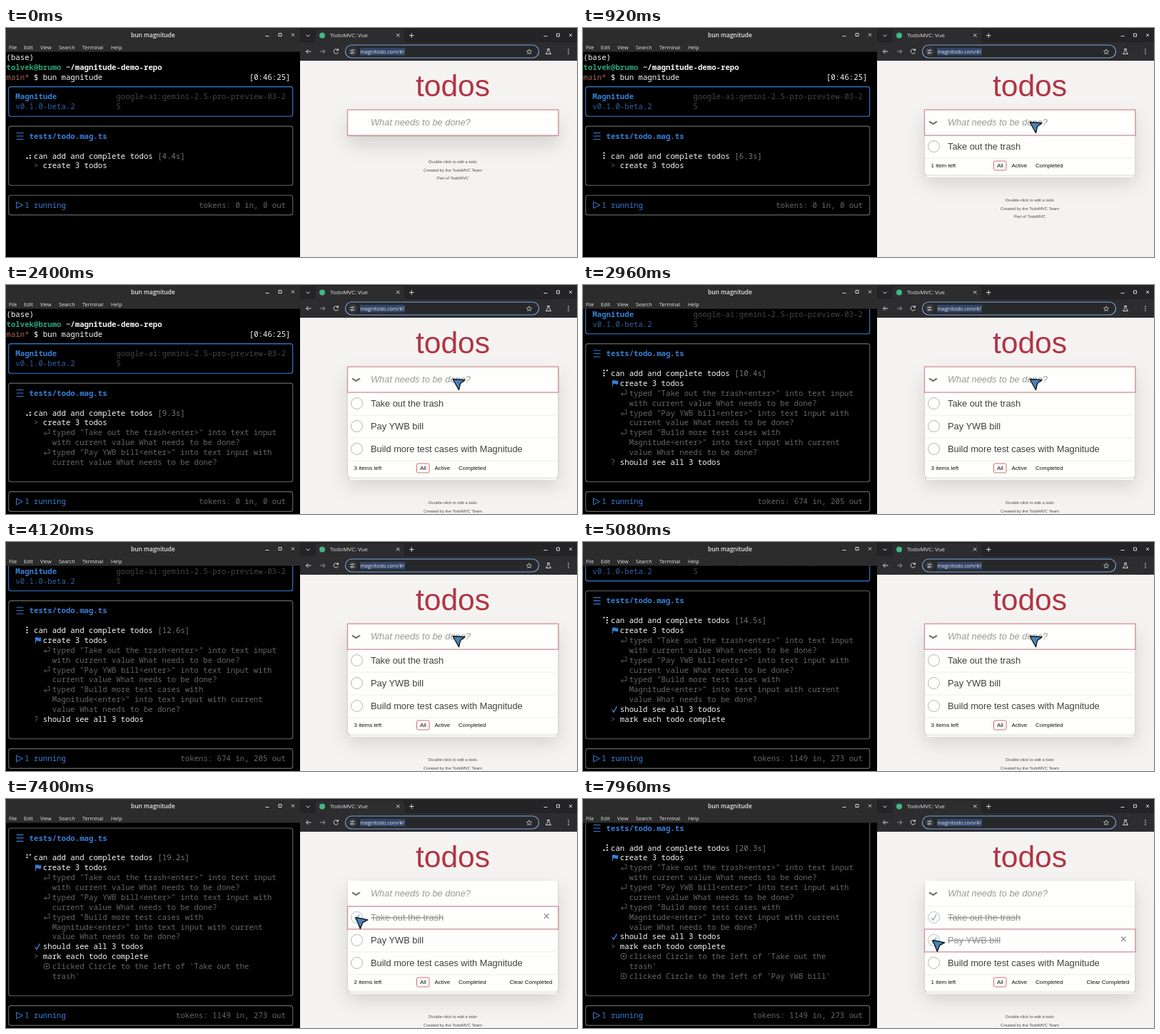
Recreate the animation shown at these times as an HTML page. Size 800 px wide and 322 px high, loop 8000 ms.

```html
<!DOCTYPE html>
<html lang="en">
<head>
<meta charset="utf-8">
<title>Test run</title>
<style>
html, body { margin: 0; width: 100%; height: 100%; overflow: hidden; background: #000; }
svg { display: block; width: 800px; height: 322px; }
text { white-space: pre; }
.term { font: 500 10.7px "Noto Sans Mono", monospace; }
.ui { font: 7.2px "Open Sans", sans-serif; fill: #e6e6e6; }
.page { font-family: "Liberation Sans", Arial, sans-serif; }
.line { fill: none; stroke: #d8d8d8; stroke-width: 1; }
.card { fill: #fefefd; filter: drop-shadow(0 1px 1px #0003) drop-shadow(0 13px 13px #0002); }
.sheet { fill: #f8f8f7; filter: drop-shadow(0 .6px .5px #0005); }
</style>
</head>
<body>
<svg viewBox="0 0 800 322">
  <defs><clipPath id="screen"><rect y="33.5" width="412" height="289"/></clipPath></defs>

  <rect width="412" height="322"/>
  <rect width="412" height="33.5" fill="#2c2c2c"/>
  <g class="ui">
    <text x="206" y="12.5" text-anchor="middle" font-weight="600" style="font-size:8.4px">bun magnitude</text>
    <text x="4" y="29.5">File</text><text x="25" y="29.5">Edit</text><text x="48" y="29.5">View</text>
    <text x="74" y="29.5">Search</text><text x="107" y="29.5">Terminal</text><text x="147" y="29.5">Help</text>
  </g>
  <path class="line" d="M363.5 11.500h5M382 7.500h4v4h-4zM400 7.500l4 4m0-4l-4 4"/>
  <g id="terminal" class="term" clip-path="url(#screen)"></g>

  <rect x="412" width="388" height="322" fill="#f4f3f2"/>
  <rect x="412" width="388" height="46" fill="#2d2d30"/>
  <path d="M412 0H800V20H562q-4 0-4-4V5q0-3-3-3H437q-3 0-3 3v11q0 4-4 4H412z" fill="#242427"/>
  <circle cx="443" cy="10.500" r="4" fill="#41b883"/>
  <path class="line" d="M420.5 9.500l2.500 2.500 2.500-2.500M547 8l4.500 4.500m0-4.500l-4.500 4.500M565 10.500h6.500m-3.250-3.250v6.500
    M753.5 11.500h5M771.5 8h4v4h-4zM789 8l4 4m0-4l-4 4M427.5 33h-7m3-3l-3 3 3 3"/>
  <path class="line" d="M440 33h7m-3-3l3 3-3 3" style="stroke:#999"/>
  <path class="line" d="M465 31a3.200 3.200 0 1 0 .4 3M465.5 29v2.500h-2.500"/>
  <rect x="475.5" y="24" width="271" height="18" rx="9" fill="#27282a" stroke="#7fa4dc" stroke-width="1.200"/>
  <circle cx="485.5" cy="33" r="6.500" fill="#37383b"/>
  <path class="line" d="M482.5 31.500h2.500M482.5 35h1m2.500 0h2.500"/>
  <circle class="line" cx="486.5" cy="31.500" r="1"/><circle class="line" cx="484.5" cy="35" r="1"/>
  <rect x="496" y="28" width="63" height="10.500" fill="#33466a"/>
  <g class="ui">
    <text x="454" y="13.300" style="font-size:7.9px">TodoMVC: Vue</text>
    <text x="496.5" y="35.700" style="font-size:7.05px">magnitodo.com/#/</text>
  </g>
  <path class="line" transform="translate(733 33.3) scale(.78)" d="M0-4.500l1.300 3 3.200.3-2.400 2.100.7 3.200-2.800-1.700-2.800 1.700.7-3.200-2.400-2.100 3.200-.3z"/>
  <path class="line" d="M758 29.500h4m-3 0v3l-2.500 4h7l-2.500-4v-3"/>
  <path d="M788 30v.01m0 2.990v.01m0 2.990v.01" stroke="#ddd" stroke-width="1.700" stroke-linecap="round"/>
  <g id="page" class="page"></g>
</svg>

<script>
const LOOP = 8000, TICK = 40, COL = 6.42, ROW = 13.87;
const BLUE = '#397fd6', DIM_BLUE = '#2c61a5', GREY = '#666', DARK = '#404040', WHITE = '#f6f6f6';
const TODOS = ['Take out the trash', 'Pay YWB bill', 'Build more test cases with Magnitude'];
const TYPING = [[420, 760], [1340, 1600], [2080, 2400]];
const CHECKED = [6740, 7560, Infinity];
const BRAILLE = ['124', '145', '1456', '456', '3456', '356', '236', '1236', '123', '1234'];

// time, seconds on the timer
const CLOCK = [[0, 4.4], [920, 6.3], [1960, 8.4], [2960, 10.4], [5080, 14.5], [6760, 17.9], [8000, 20.4]];
// time, x, y, angle
const POINTER = [[0, 626, 132.5, 0], [6710, 626, 132.5, 0], [7000, 490, 166.5, 8],
  [7420, 490, 166.5, 8], [7640, 490, 198.5, 8], [8000, 490, 198.5, 8]];

// terminal steps: time shown, icon, column, colour, lines
const STEPS = [
  [0, 'step', 8, WHITE, 'create 3 todos'],
  [1280, 'enter', 10, GREY, 'typed "Take out the trash<enter>" into text input', 'with current value What needs to be done?'],
  [2040, 'enter', 10, GREY, `typed "${TODOS[1]}<enter>" into text input with`, 'current value What needs to be done?'],
  [2840, 'enter', 10, GREY, 'typed "Build more test cases with', 'Magnitude<enter>" into text input with current', 'value What needs to be done?'],
  [2840, 'check', 8, WHITE, 'should see all 3 todos'],
  [5080, 'next', 8, WHITE, 'mark each todo complete'],
  [7240, 'click', 10, GREY, "clicked Circle to the left of 'Take out the", "trash'"],
  [7840, 'click', 10, GREY, `clicked Circle to the left of '${TODOS[1]}'`],
];

const escape = s => s.replace(/&/g, '&amp;').replace(/</g, '&lt;');
const text = (x, y, s, fill, attrs = '') => `<text x="${x}" y="${y}" fill="${fill}" ${attrs}>${escape(s)}</text>`;
const path = (d, stroke, width = 1, fill = 'none') =>
  `<path d="${d}" stroke="${stroke}" stroke-width="${width}" fill="${fill}"/>`;
const rect = (x, y, w, h, attrs) => `<rect x="${x}" y="${y}" width="${w}" height="${h}" ${attrs}/>`;

function sample(keys, t, ease = p => p) {
  const i = Math.max(1, keys.findIndex(k => k[0] > t));
  const a = keys[i - 1], b = keys[i];
  const p = ease((t - a[0]) / (b[0] - a[0]));
  return a.slice(1).map((v, n) => v + (b[n + 1] - v) * p);
}

function drawTerminal(t) {
  const steps = STEPS.filter(s => s[0] <= t);
  const end = 13 + steps.reduce((n, s) => n + s.length - 4, -1);
  const scroll = Math.max(0, end + 3 - 20);
  const [seconds] = sample(CLOCK, t);
  const mid = row => 41 + (row - scroll) * ROW;
  const put = (col, row, s, fill, bold) =>
    text(0.5 + col * COL, mid(row) + 3.8, s, fill, bold ? 'font-weight="700"' : '');
  const box = (from, to, stroke) =>
    rect(3.7, mid(from), 398, (to - from) * ROW, `rx="3" fill="none" stroke="${stroke}" stroke-width="1.1"`);
  const icon = (name, row) => {
    const y = mid(row);
    switch (name) {
      case 'enter': return path(`M61 ${y - 4}v5.500h-7.500m2.500-2.500l-2.500 2.500 2.500 2.500M58.500 ${y - 4}h2.500`, GREY, 0.9);
      case 'click': return `<circle cx="57" cy="${y}" r="4" fill="none" stroke="${GREY}"/><circle cx="57" cy="${y}" r="1.200" fill="${GREY}"/>`;
      case 'flag': return path(`M41.5 ${y + 4.5}v-8.500`, BLUE, 1.1) + path(`M42 ${y - 3.5}q2-1 3.500 0t3.500 0v4.500q-2 1-3.500 0t-3.500 0z`, BLUE, 0.5, BLUE);
      case 'done': return path(`M40.5 ${y + 0.5}l2.500 3.500 4.500-8`, BLUE, 1.3);
      default: return put(6, row, name, GREY);
    }
  };
  const labels = {
    step: t < 2840 ? '>' : 'flag',
    check: t < 5080 ? '?' : 'done',
    next: '>',
  };
  const tokens = t < 2840 ? '0 in, 0 out' : t < 5080 ? '674 in, 205 out' : '1149 in, 273 out';
  const usage = 'tokens: ' + tokens;

  let out = put(0, 0, '(base)', WHITE)
    + put(0, 1, 'tolvek@brumo', '#2fa37c', true) + put(13, 1, '~/magnitude-demo-repo', WHITE, true)
    + put(0, 2, 'main', '#a9655c') + put(4, 2, '*', '#d8463c') + put(6, 2, '$ bun magnitude', WHITE)
    + put(53, 2, '[0:46:25]', WHITE)
    + box(3, 6, BLUE) + put(2, 4, 'Magnitude', BLUE, true) + put(2, 5, 'v0.1.0-beta.2', DIM_BLUE)
    + put(24, 4, 'google-ai:gemini-2.5-pro-preview-03-2', '#454545') + put(24, 5, '5', '#454545')
    + box(7, end, GREY)
    + path(`M14.5 ${mid(8) - 4.5}h10m-10 4.500h10m-10 4.500h10`, BLUE, 1.1)
    + put(5, 8, 'tests/todo.mag.ts', BLUE, true)
    + put(6, 10, 'can add and complete todos', WHITE) + put(33, 10, `[${seconds.toFixed(1)}s]`, '#777');

  for (const dot of BRAILLE[(5 + t / TICK) % 10]) {
    const n = dot - 1;
    out += `<circle cx="${29.5 + (n > 2) * 4.3}" cy="${mid(10) - 4 + (n % 3) * 3.6}" r="1.1" fill="${WHITE}"/>`;
  }

  let row = 11;
  for (const [, kind, col, fill, ...lines] of steps) {
    out += icon(labels[kind] || kind, row);
    for (const line of lines) out += put(col, row++, line, fill);
  }

  const y = mid(end + 2);
  return out + box(end + 1, end + 3, GREY)
    + path(`M14.5 ${y - 4.5}l9 4.500-9 4.500z`, BLUE) + put(4, end + 2, '1 running', BLUE)
    + put(61 - usage.length, end + 2, usage, GREY);
}

function drawTodo(label, i, t) {
  const y = 167 + i * 32, done = t >= CHECKED[i];
  const fade = Math.min(1, Math.max(0, (t - CHECKED[i]) / 200));
  const shade = done ? Math.round(64 + 84 * fade) : 64;
  const color = `rgb(${shade},${shade},${shade})`;
  let out = path(`M479 ${y - 16}h295`, '#e6e6e6', 0.7)
    + `<circle cx="491.5" cy="${y - 0.5}" r="8" fill="none" stroke="${done ? '#9db5af' : '#a0a0a0'}" stroke-width=".8"/>`
    + text(511, y + 4, label, color, `font-size="12.85" ${done ? 'text-decoration="line-through"' : ''}`);
  if (done) out += path(`M488 ${y}l2.500 3.300 4.500-7.800`, '#6b9f95', 1.1);
  return out;
}

function drawPage(t) {
  const count = TYPING.filter(w => t >= w[1]).length;
  const clicked = CHECKED.filter(c => t >= c).length;
  const bottom = count ? 173 + count * 32 : 151;
  const typing = TYPING.findIndex(([a, b]) => t >= a && t < b);

  let out = text(626, 95.8, 'todos', '#b23545', 'font-size="42.6" text-anchor="middle"')
    + rect(479, 115, 294.5, bottom - 115, 'class="card"');
  if (count) {
    out += rect(482, 140, 289, bottom - 135, 'class="sheet"')
      + rect(480.5, 140, 292, bottom - 137.5, 'class="sheet"')
      + rect(479, 115, 294.5, bottom - 115, 'class="sheet" style="fill:#fefefd"');
  }

  if (typing >= 0) {
    const [a, b] = TYPING[typing], label = TODOS[typing];
    out += text(511, 137.3, label.slice(0, Math.ceil((t - a) / (b - a) * label.length)), DARK, 'font-size="12.85"');
  } else {
    out += text(511, 137.3, 'What needs to be done?', '#999', 'font-size="12.85" font-style="italic"');
  }

  if (count) {
    out += path('M485 131.300l5.500 3.700 5.500-3.700', '#737373', 2.2);
    out += TODOS.slice(0, count).map((label, i) => drawTodo(label, i, t)).join('');
    const y = bottom - 9, left = count - clicked;
    const small = (x, s, attrs = '') => text(x, y, s, '#111', 'font-size="8" ' + attrs);
    out += path(`M479 ${bottom - 22}h295`, '#e2e2e2', 0.7)
      + small(487.5, `${left} item${left === 1 ? '' : 's'} left`)
      + rect(575.5, y - 9, 17.5, 13, 'rx="1.8" fill="none" stroke="#ce5c5c" stroke-width=".9"')
      + small(580, 'All') + small(600.5, 'Active') + small(634, 'Completed');
    if (clicked) out += small(765.5, 'Clear Completed', 'text-anchor="end"');
  }

  const focusY = clicked ? 119 + clicked * 32 : 115;
  out += rect(478.5, focusY, 295.5, clicked ? 32 : 36, 'fill="none" stroke="#cf8a90" stroke-width="1.2"');
  if (clicked) out += path(`M754 ${focusY + 10.5}l6.500 6.500m0-6.500l-6.500 6.500`, '#888', 1.1);

  ['Double-click to edit a todo', 'Created by the TodoMVC Team', 'Part of TodoMVC'].forEach((line, i) => {
    out += text(626, bottom + 39 + i * 11.7, line, '#4d4d4d', 'font-size="5.9" text-anchor="middle"');
  });

  if (t >= TYPING[0][0]) {
    const [x, y, angle] = sample(POINTER, t, p => p * p * (3 - 2 * p));
    out += `<g transform="translate(${x} ${y}) rotate(${angle})">`
      + '<path d="M0 0L17 1 10.5 6 8.5 15z" fill="#4a83bd" stroke="#111" stroke-width="1.300" stroke-linejoin="round"/></g>';
  }
  return out;
}

const terminal = document.getElementById('terminal');
const page = document.getElementById('page');
let shown = -1;

function frame() {
  const t = Math.floor(performance.now() % LOOP / TICK) * TICK;
  if (t !== shown) {
    shown = t;
    terminal.innerHTML = drawTerminal(t);
    page.innerHTML = drawPage(t);
  }
  requestAnimationFrame(frame);
}
frame();
</script>
</body>
</html>
```
